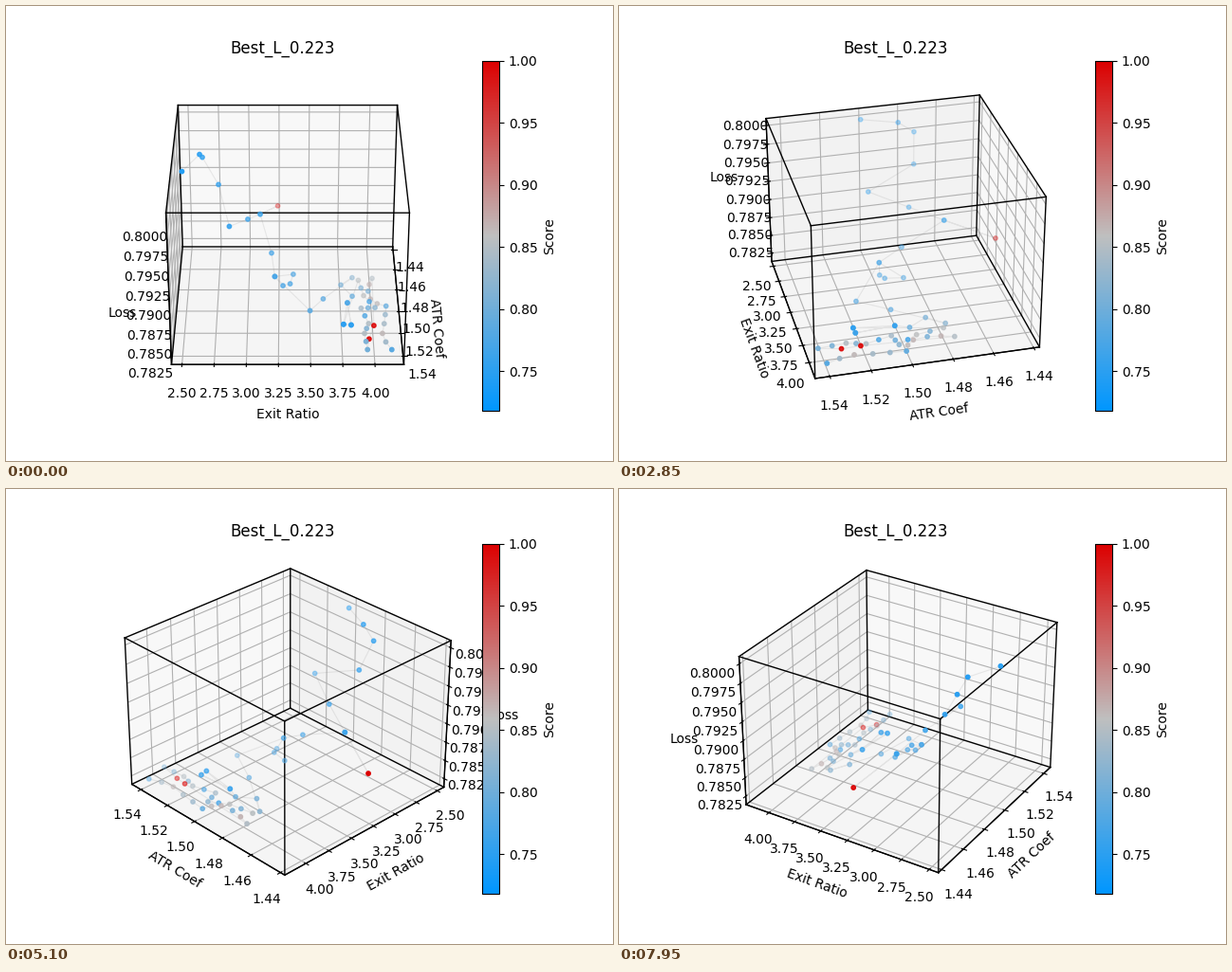
Write a matplotlib script that moves like this. It is 640 px wide and 480 px high and loops after 8000 ms.

```python
from itertools import combinations, product

import matplotlib.pyplot as plt
import numpy as np
from matplotlib.animation import FuncAnimation
from matplotlib.colors import LinearSegmentedColormap
from matplotlib.ticker import MultipleLocator

LOOP_MS, TICK_MS, STEP_TICKS = 8000, 50, 3
DEGREES_PER_STEP = 4

# Axis order: ATR coefficient, exit ratio, loss.
LOW = np.array([1.43713, 2.4184, 0.78133])
HIGH = np.array([1.54704, 4.2246, 0.80092])
# Sides of the drawn box in thousandths; positions below are offsets from its centre.
BOX = np.array([1190.5, 1190.5, 892.9])

rng = np.random.default_rng(4)


def strand(count, *knots):
    """Trials spread along a bent line near the floor of the box."""
    knots = np.array(knots)
    along = np.linspace(0, len(knots) - 1, count)
    atr, ratio = (np.interp(along, range(len(knots)), column) for column in knots.T)
    loss = np.maximum(-405, -330 - 0.15 * ratio)
    return np.column_stack([atr, ratio, loss])


descent = np.array([
    (88, -543, 404), (-100, -460, 404), (-186, -450, 342), (-164, -367, 190),
    (104, -304, 88), (-98, -212, 16), (-278, -149, -55), (-542, -55, -151),
    (-27, -86, -151), (102, -68, -219), (110, -25, -271), (91, 13, -271),
    (-8, 30, -272), (272, 117, -325), (101, 189, -359),
])
inner = strand(6, (-154, 351), (-63, 287), (38, 346), (111, 318), (325, 332), (328, 292))
middle = strand(13, (-135, 384), (17, 408), (124, 465), (147, 390), (290, 425),
                (390, 400), (540, 410))
outer = strand(11, (-174, 461), (-60, 431), (69, 447), (100, 525), (242, 512),
               (400, 490), (520, 536))
best = np.array([(420, 423, -405), (324, 451, -384)])

descent_scores = np.linspace(0.745, 0.785, len(descent))
descent_scores[7] = 1
# The search comes back to some positions.
visits = np.r_[0:8, 6, 8:13, 9, 13:len(descent)]

offsets = np.vstack([descent[visits], inner, inner[3:], middle, best, outer])
scores = np.concatenate([
    descent_scores[visits],
    np.linspace(0.82, 0.75, len(inner)), np.full(3, 0.75),
    rng.uniform(0.76, 0.86, len(middle)),
    np.ones(len(best)),
    rng.uniform(0.77, 0.87, len(outer)),
])
points = (LOW + HIGH) / 2 + offsets * (HIGH - LOW) / BOX
cmap = LinearSegmentedColormap.from_list("score", ["#0096ff", "#bfbfbf", "#dc0000"])

fig = plt.figure(figsize=(6.4, 4.8), dpi=100)
ax = fig.add_subplot(projection="3d")
scatter = ax.scatter(*points.T, s=10, c=scores, cmap=cmap, vmin=0.7182, vmax=1)
ax.plot(*points.T, color="gray", alpha=0.15, linewidth=0.8)

for a, b in combinations(product(*zip(LOW, HIGH)), 2):
    if sum(p != q for p, q in zip(a, b)) == 1:
        ax.plot(*zip(a, b), color="black", linewidth=1)

ax.set(xlim=(LOW[0], HIGH[0]), ylim=(LOW[1], HIGH[1]), zlim=(LOW[2], HIGH[2]),
       xlabel="ATR Coef", ylabel="Exit Ratio", zlabel="Loss", title="Best_L_0.223")
for axis, spacing in zip((ax.xaxis, ax.yaxis, ax.zaxis), (0.02, 0.25, 0.0025)):
    axis.set_major_locator(MultipleLocator(spacing))
fig.colorbar(scatter, label="Score")


def update(tick):
    # The tiny offset settles which side wall is visible when seen head-on.
    ax.view_init(elev=30, azim=0.001 + DEGREES_PER_STEP * (tick // STEP_TICKS))
    return ax,


anim = FuncAnimation(fig, update, frames=LOOP_MS // TICK_MS, interval=TICK_MS,
                     init_func=lambda: update(0), repeat=True, repeat_delay=0)
plt.show()
```
